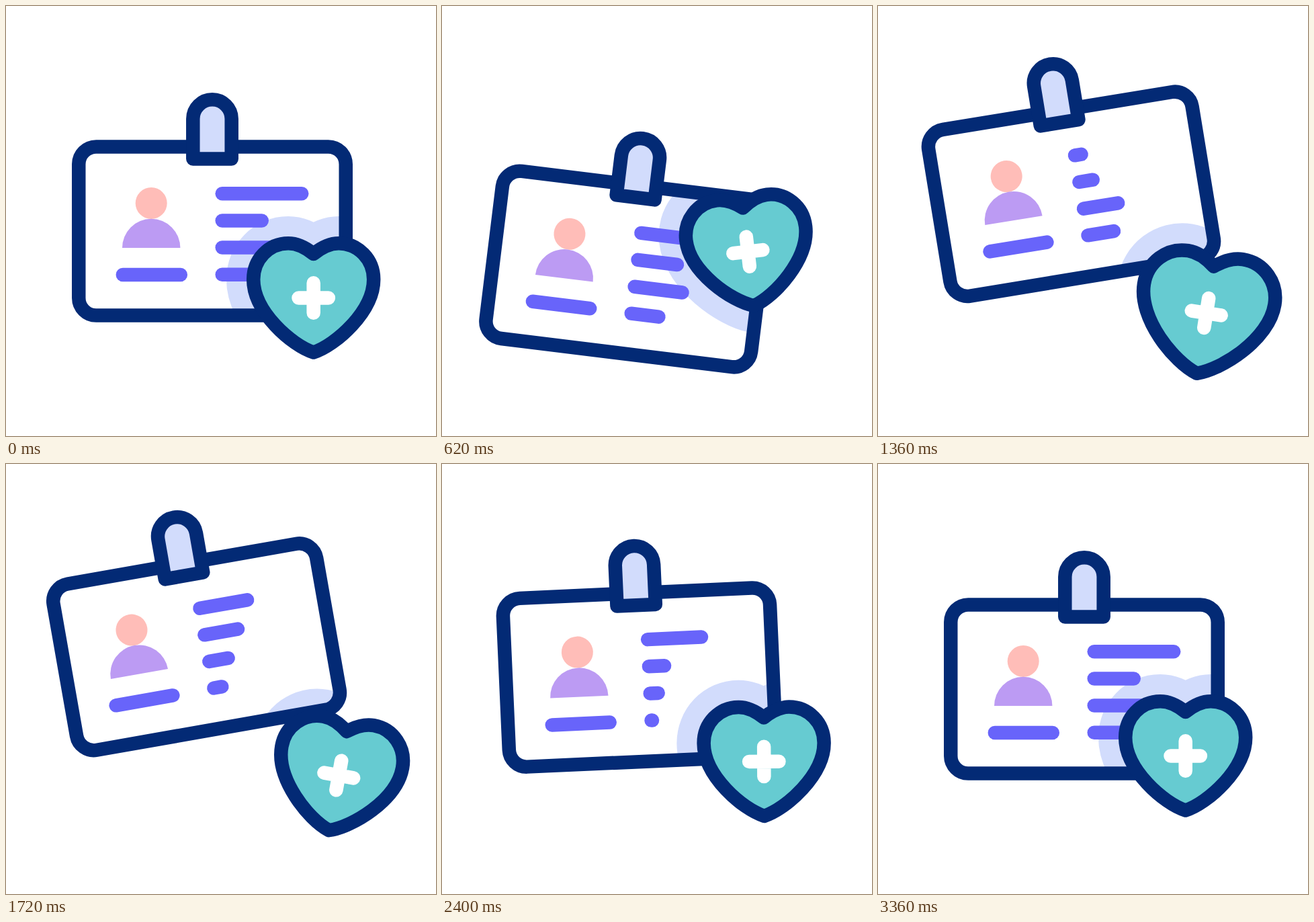
An HTML page for the animation above (3600 ms loop, 640 px wide and 640 px high).

```html
<!DOCTYPE html>
<html lang="en">
<head>
<meta charset="utf-8">
<title>Health card</title>
<style>
  html, body { margin: 0; width: 100%; height: 100%; overflow: hidden; background: #fff; }
  svg { display: block; width: 100vw; height: 100vh; }
  path, rect { stroke-linejoin: round; }
  .ink { stroke: #032a75; stroke-width: 20.5; }
  .text { fill: none; stroke: #6864fa; stroke-width: 20.5; stroke-linecap: round; }
</style>
</head>
<body>
<svg viewBox="0 0 640 640">
  <defs>
    <path id="shape" d="M0-47C11.2-56 23.5-62.7 37.5-62.7C66.5-62.7 89.5-39 89.5-9C89.5 39 32.7 89 0 99.5
      C-32.7 89-89.5 39-89.5-9C-89.5-39-66.5-62.7-37.5-62.7C-23.5-62.7-11.2-56 0-47Z"/>
    <clipPath id="inside">
      <rect id="window" x="-198.75" y="-125.5" width="397.5" height="251" rx="26"/>
    </clipPath>
  </defs>
  <g clip-path="url(#inside)">
    <g id="glow"><use id="halo" href="#shape" fill="#d2dcfc" stroke="#d2dcfc"/></g>
  </g>
  <g id="card">
    <rect class="ink" x="-198.75" y="-125.5" width="397.5" height="251" rx="26" fill="none"/>
    <circle cx="-90.8" cy="-41.5" r="23.5" fill="#ffbdb8"/>
    <path d="M-134 25a43.2 43.2 0 0 1 86.4 0z" fill="#bc9bf3"/>
    <path class="text" d="M-133.2 65h86"/>
    <g id="lines"></g>
    <path class="ink" d="M-28.7-107.4V-167a28.7 28.7 0 0 1 57.4 0V-107.4z" fill="#d2dcfc"/>
  </g>
  <g id="badge">
    <use id="heart" href="#shape" fill="#66cbd1" stroke="#032a75"/>
    <path d="M-22.2 0h44.4M0-22.2v44.4" stroke="#fff" stroke-width="20.5" stroke-linecap="round"/>
  </g>
</svg>
<script>
const LOOP = 3600;
const $ = id => document.getElementById(id);

// Key poses as [degrees, x, y] offsets from rest
const rest = [0, 0, 0];
const poses = [
  { at: 110, card: rest, heart: rest },
  { at: 830, card: [8.8, -40.2, 71], heart: [-8.2, -3, -86.5] },
  { at: 980, card: [-7, -15, -43.5], heart: [0, -3, -46] },
  { at: 1360, card: [-9.3, -19.5, -55.2], heart: [9, 31, 22.5] },
  { at: 2040, card: [-10.2, -25.2, -66], heart: [10.6, 39.8, 31] },
  { at: 2700, card: [3.2, -2.7, 19.1], heart: [-8.5, 5.4, -8.6] },
  { at: 3300, card: rest, heart: rest }
];

// Smooth curve through the poses that never overshoots them
function follow(part, c, t) {
  const last = poses.length - 1;
  const value = j => poses[j][part][c];
  const slope = j => (value(j + 1) - value(j)) / (poses[j + 1].at - poses[j].at);
  const tangent = j => {
    if (j === 0 || j === last) return 0;
    const a = slope(j - 1), b = slope(j);
    return a * b <= 0 ? 0 : 2 * a * b / (a + b);
  };
  if (t <= poses[0].at) return value(0);
  if (t >= poses[last].at) return value(last);
  const i = poses.findIndex(p => p.at > t) - 1;
  const h = poses[i + 1].at - poses[i].at, u = (t - poses[i].at) / h, v = 1 - u;
  return value(i) * v * v * (1 + 2 * u) + value(i + 1) * u * u * (3 - 2 * u)
    + h * u * v * (v * tangent(i) - u * tangent(i + 1));
}

const place = (part, t, cx, cy) =>
  `translate(${cx + follow(part, 1, t)} ${cy + follow(part, 2, t)}) rotate(${follow(part, 0, t)})`;

// Two beats while the card leans back
function beat(t) {
  const n = (t - 1090) / 550;
  return n > 0 && n < 2 ? 1 + 0.1 * Math.sin(Math.PI * n) ** 2 : 1;
}

function ease(t, start, span) {
  const p = Math.min(1, Math.max(0, (t - start) / span));
  return p < 0.5 ? 2 * p * p : 1 - 2 * (1 - p) ** 2;
}

const lines = [118.5, 59, 71.5, 41].map((len, i) => {
  const el = document.createElementNS("http://www.w3.org/2000/svg", "path");
  el.setAttribute("class", "text");
  $("lines").append(el);
  return { el, len, y: -55.8 + i * 40.2, first: 1122 + i * 64, second: 1922 + i * 46 };
});

// Each line is wiped, written long, wiped and written back
function lineLength({ len, first, second }, t) {
  const full = 106, span = 300;
  if (t < first + span) return len * (1 - ease(t, first, span));
  if (t < second) return full * ease(t, first + span, second - first - span);
  if (t < second + span) return full * (1 - ease(t, second, span));
  return len * ease(t, second + span, span);
}

function draw(t) {
  const card = place("card", t, 307, 335);
  const badge = place("heart", t, 457.7, 434.5);
  const s = beat(t);
  for (const id of ["card", "window"]) $(id).setAttribute("transform", card);
  for (const id of ["badge", "glow"]) $(id).setAttribute("transform", badge);
  for (const [id, width] of [["heart", 20.5], ["halo", 80.5]]) {
    $(id).setAttribute("transform", `translate(0 -18.5) scale(${s})`);
    $(id).setAttribute("stroke-width", width / s);
  }
  for (const l of lines) l.el.setAttribute("d", `M14.7 ${l.y}h${lineLength(l, t)}`);
}

const begin = performance.now();
function tick(now) {
  draw(Math.max(0, now - begin) % LOOP);
  requestAnimationFrame(tick);
}
draw(0);
requestAnimationFrame(tick);
</script>
</body>
</html>
```
